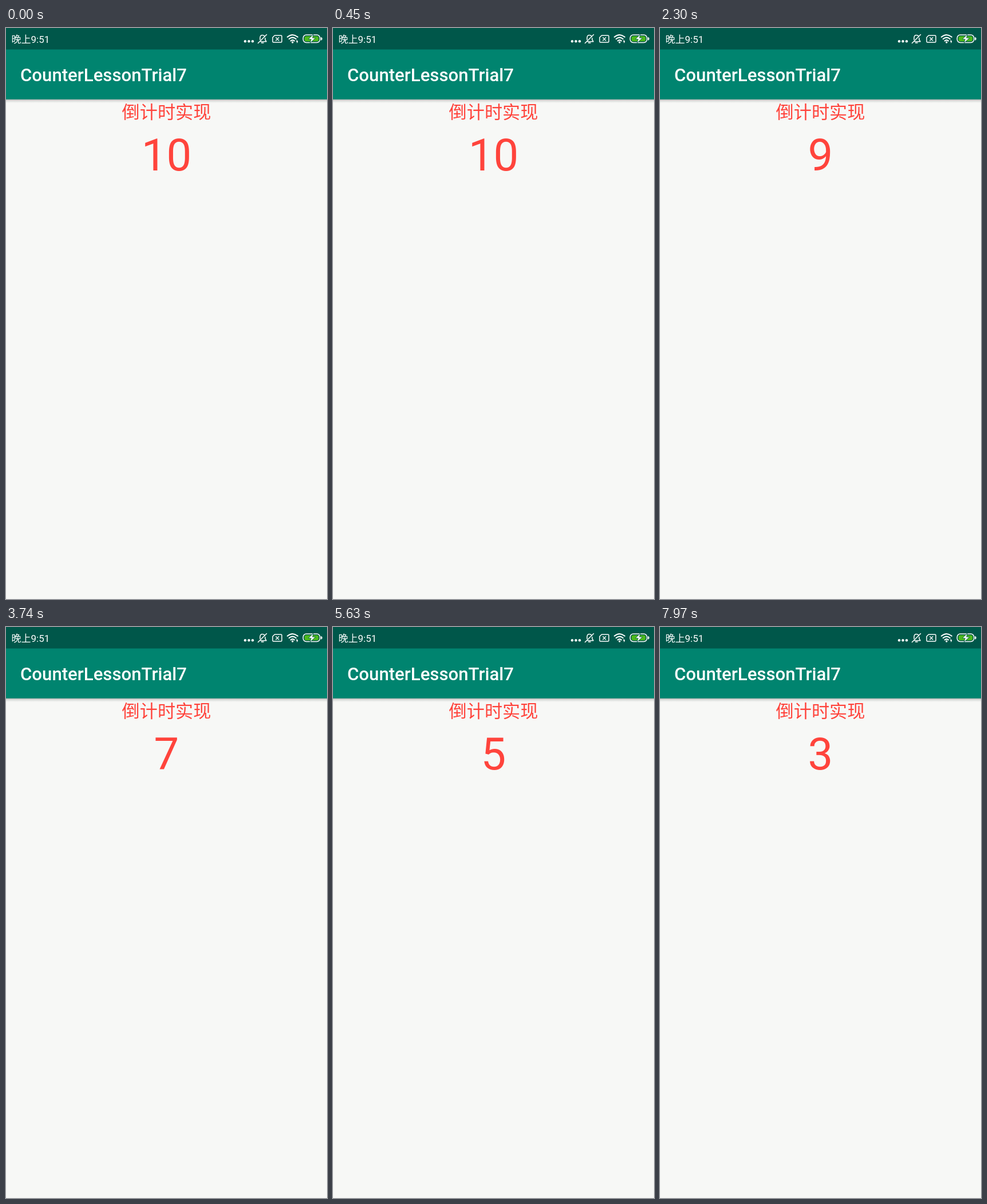
An HTML page for the animation above (8000 ms loop, 561 by 998 pixels).

```html
<!DOCTYPE html>
<html lang="zh">
<head>
<meta charset="utf-8">
<title>Countdown</title>
<style>
  html, body { margin: 0; width: 100%; height: 100%; overflow: hidden; background: #f7f8f6; }
  svg { display: block; width: 561px; height: 998px; }
  text { font-family: Roboto, "Noto Sans CJK SC", "Noto Sans CJK", sans-serif; }
  .line { fill: none; stroke: #fff; stroke-width: 1.5; stroke-linecap: round; stroke-linejoin: round; }
  .red { fill: #ff443c; text-anchor: middle; }
</style>
</head>
<body>
<svg viewBox="0 0 561 998">
  <defs>
    <linearGradient id="shadow" x2="0" y2="1">
      <stop offset="0" stop-color="#000" stop-opacity=".34"/>
      <stop offset=".4" stop-color="#000" stop-opacity=".12"/>
      <stop offset="1" stop-color="#000" stop-opacity="0"/>
    </linearGradient>
  </defs>

  <rect width="561" height="998" fill="#f7f8f6"/>
  <rect y="124" width="561" height="7" fill="url(#shadow)"/>
  <rect y="37" width="561" height="87.7" fill="#00846f"/>
  <rect width="561" height="37.5" fill="#00574a"/>

  <g fill="#fff">
    <text x="9.5" y="25.7" font-size="17">晚上9:51</text>
    <text x="25" y="93" font-size="31.17" font-weight="500">CounterLessonTrial7</text>

    <!-- more notifications -->
    <circle cx="418" cy="23.3" r="2.2"/>
    <circle cx="424.5" cy="23.3" r="2.2"/>
    <circle cx="431" cy="23.3" r="2.2"/>

    <!-- muted bell -->
    <path class="line" d="M444 20.5V17.5C444 14 445.5 12.5 448 12.5C449.5 12.5 450.8 13 451.5 14M453 17.5V20.5L455 23.8H445M446.5 26H450M440.5 26.5L455.5 11.5"/>

    <!-- no SIM -->
    <path class="line" d="M469.5 13H480.5Q482 13 482 14.5V23.5Q482 25 480.5 25H467.5Q466 25 466 23.5V16.5Z"/>
    <path class="line" d="M471.8 16.8L476.7 21.7M476.7 16.8L471.8 21.7"/>

    <!-- wifi -->
    <g class="line" stroke-width="2" style="stroke-width:2">
      <path d="M491.8 15.8Q500.8 8.2 509.8 15.8"/>
      <path d="M494.7 19.2Q500.8 14 506.9 19.2"/>
      <path d="M497.6 22.5Q500.8 19.7 504 22.5"/>
    </g>
    <circle cx="500.8" cy="25" r="1.7"/>
    <path d="M507.5 21.5H509L510.3 24L508.5 27V24.5H507.5Z"/>

    <!-- charging battery -->
    <rect class="line" x="519.3" y="12" width="29.4" height="13.5" rx="5.5"/>
    <rect x="521.6" y="14.2" width="24.8" height="9.1" rx="3.4" fill="#4cb81c"/>
    <path d="M550.3 15.8Q552.8 16.3 552.8 18.8T550.3 21.8Z"/>
    <path d="M537 11L528.5 19.7H533.3L531.2 26.5L541 17.3H535.7Z" stroke="#00574a" stroke-width=".8"/>
  </g>

  <text class="red" x="280.5" y="158.3" font-size="31.17">倒计时实现</text>
  <text class="red" id="count" x="280.5" y="249.3" font-size="77.9">10</text>
</svg>
<script>
  const LOOP = 8000, FIRST_TICK = 1630, TICK = 1000, START = 10;
  const count = document.getElementById('count');

  function draw() {
    const time = performance.now() % LOOP;
    const ticks = Math.max(0, Math.floor((time - FIRST_TICK) / TICK) + 1);
    count.textContent = START - ticks;
    requestAnimationFrame(draw);
  }
  draw();
</script>
</body>
</html>
```
